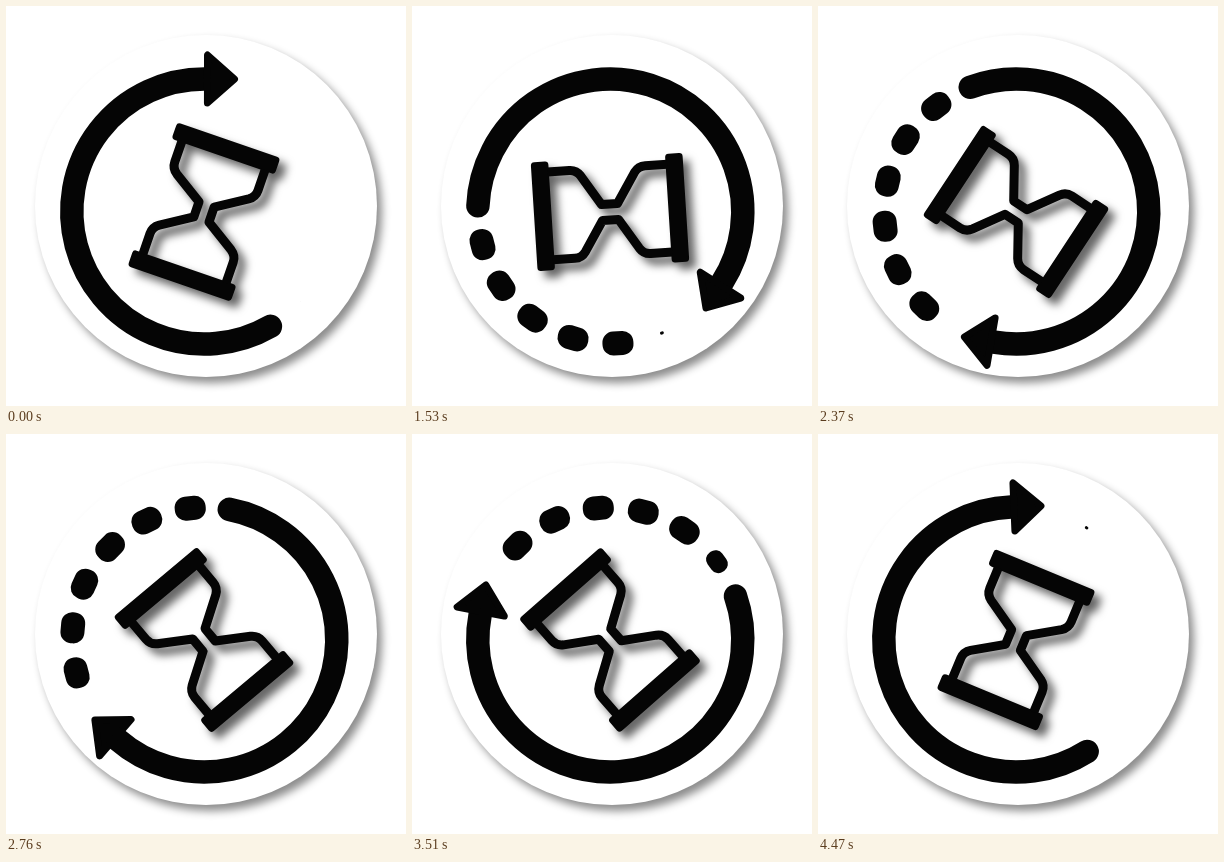
An HTML page that plays this animation: 400x400 px, repeating every 4500 ms.

```html
<!DOCTYPE html>
<html lang="en">
<head>
<meta charset="utf-8">
<title>Hourglass timer</title>
<style>
  html, body { margin: 0; width: 100%; height: 100%; overflow: hidden; background: #fff; }
  svg { display: block; width: 100vw; height: 100vh; fill: #050505; }
  .disc { fill: #fff; filter: drop-shadow(5px 6px 4px rgba(0, 0, 0, .45)); }
  .shadow { filter: drop-shadow(7px 7px 4px rgba(0, 0, 0, .6)); }
  .arc, .glass { fill: none; stroke: #050505; stroke-linejoin: round; }
  .arc { stroke-width: 23.5; stroke-linecap: round; }
  .glass { stroke-width: 9; }
  .head { stroke: #050505; stroke-width: 7; stroke-linejoin: round; }
</style>
</head>
<body>
<svg viewBox="0 0 400 400">
  <circle class="disc" cx="200" cy="200" r="171"/>
  <g transform="translate(198.3 205.5)">
    <g id="ring">
      <path class="arc" d="M66.25 114.75A132.5 132.5 0 1 1 0-132.5"/>
      <path class="head" d="M3-156.5V-108.5L30-132.5Z"/>
    </g>
  </g>
  <g class="shadow">
    <g id="hourglass">
      <rect x="-54.5" y="-76" width="109" height="17.5" rx="3.5"/>
      <rect x="-54.5" y="58.5" width="109" height="17.5" rx="3.5"/>
      <path class="glass" id="side" d="M44-60V-38Q44-31 38-27L8-8V8L38 27Q44 31 44 38V60"/>
      <use href="#side" transform="scale(-1 1)"/>
    </g>
  </g>
</svg>
<script>
const LOOP = 4500;
const ring = document.getElementById('ring');
const hourglass = document.getElementById('hourglass');

const clamp = x => Math.max(0, Math.min(1, x));

const dots = Array.from({ length: 6 }, () => {
  const dot = document.createElementNS('http://www.w3.org/2000/svg', 'rect');
  const box = { x: -15.5, y: -12, width: 31, height: 24, rx: 11 };
  for (const name in box) dot.setAttribute(name, box[name]);
  return ring.appendChild(dot);
});

// Slow turn, rest, quick return
const tilt = t => 19 + 121 * (clamp(t / 2750) - clamp((t - 3500) / 1000));

function draw(t) {
  ring.setAttribute('transform', `rotate(${360 * t / LOOP})`);
  hourglass.setAttribute('transform', `translate(198 206) rotate(${tilt(t)})`);
  dots.forEach((dot, k) => {
    const grow = clamp((t - 300 * k) / 250);
    const shrink = clamp((3700 + 160 * k - t) / 250);
    dot.setAttribute('transform', `rotate(${133 - 19.7 * k}) translate(0 -132) scale(${Math.min(grow, shrink)})`);
  });
}

function frame() {
  draw(performance.now() % LOOP);
  requestAnimationFrame(frame);
}
frame();
</script>
</body>
</html>
```
